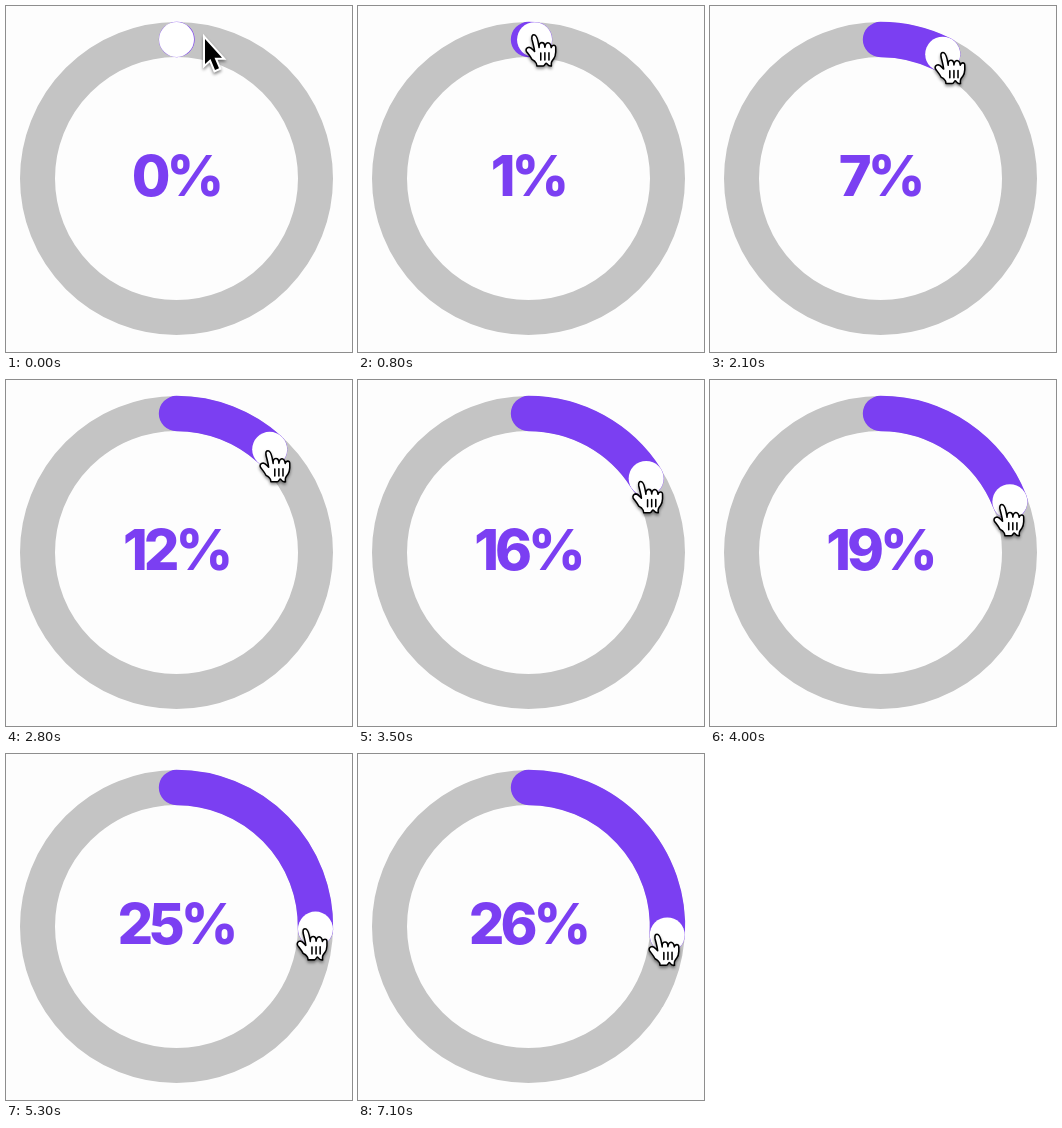
An HTML page for the animation above (7.8 s loop, 346 px wide and 346 px high).

```html
<!DOCTYPE html>
<html lang="en">
<head>
<meta charset="utf-8">
<title>Circular slider</title>
<style>
  html, body { margin: 0; width: 100%; height: 100%; overflow: hidden; background: #fdfdfd; }
  svg { display: block; width: 100%; height: 100%; }
  text { font: 800 56px Inter, "Open Sans", sans-serif; letter-spacing: -4px; fill: #7b3ff2; text-anchor: middle; }
  .cursor { filter: drop-shadow(0 2px 1.5px rgba(0, 0, 0, .45)); }
</style>
</head>
<body>
<svg viewBox="0 0 346 346">
  <circle cx="170.5" cy="172.5" r="139" fill="none" stroke="#c4c4c4" stroke-width="35"/>
  <path id="arc" fill="none" stroke="#7b3ff2" stroke-width="35.4" stroke-linecap="round"/>
  <circle id="knob" r="17.5" fill="#fff"/>
  <text id="label" x="170" y="190"></text>
  <g id="arrow" class="cursor">
    <path d="M1 2V27L6.5 22 11 33 15 31.3 10.5 20.8H18Z"
          stroke="#fff" stroke-width="4" paint-order="stroke"/>
  </g>
  <g id="hand" class="cursor">
    <g transform="scale(2.05) translate(-12.2 -8.05)" fill="#fff" stroke="#000"
       stroke-width=".75" stroke-linecap="round" stroke-linejoin="round">
      <path d="M11.3 20.4C10.5 18.8 9.4 17.6 8.6 16.5 8.1 15.4 8.9 14.4 9.9 14.4
        C11 14.5 11.8 15.8 12.6 16.5 12.4 14.4 11.7 12.4 11.3 10.5
        C11.1 9 11.5 8.4 12.3 8.4 13.5 8.4 13.9 10 14.3 11.8L14.8 14.6
        C14.7 13 15.2 12.2 16.1 12.2 17.2 12.2 17.6 13 17.6 14.5
        C17.8 12.9 18.2 12.4 19.1 12.3 20.3 12.4 20.5 13.3 20.7 14.6
        C21 13.2 22.9 13.1 22.9 14.5V16.8C22.8 18.6 22.6 19.2 22 19.9
        C20.8 21.4 20.6 21.8 20.8 23.6 19.6 23.8 19.3 23.5 18.6 22.5
        Q18.2 22 17.9 22.5C17.2 23.6 17 23.6 16.8 23.6H13.7
        C13.8 22.2 13.4 22.1 12.4 21.1Z"/>
      <path d="M15.6 17.3V20.7M17.6 17.2V20.7M19.6 17.2V20.7"/>
    </g>
  </g>
</svg>
<script>
const LOOP = 7800, STEP = 100;
const APPROACH_END = 400, DRAG_START = 800, DRAG_END = 5500;
const CX = 170.5, CY = 172.5, R = 139, KNOB_R = 17.5;
const POINTER_START = [198, 31];

const [arc, knob, label, arrow, hand] =
  ["arc", "knob", "label", "arrow", "hand"].map(id => document.getElementById(id));

const radians = degrees => degrees * Math.PI / 180;
const lerp = (a, b, p) => a + (b - a) * p;

// Cubic from a to b with the given slopes at its ends.
function hermite(a, b, slopeA, slopeB, u) {
  return lerp(a, b, u * u * (3 - 2 * u))
    + u * (1 - u) * (slopeA * (1 - u) - slopeB * u);
}

function polar(degrees, radius) {
  const a = radians(degrees);
  return [CX + radius * Math.sin(a), CY - radius * Math.cos(a)];
}

function sliderAngle(t) {
  if (t < DRAG_START) return 0;
  const u = Math.min((t - DRAG_START) / (DRAG_END - DRAG_START), 1);
  return hermite(2.5, 93.5, 69, 53, u);
}

// The pointer keeps close to the knob, drifting inwards as it goes round.
function pointerAt(t, angle) {
  const grip = polar(angle - 0.4, 136.5 + 8 * Math.cos(radians(2 * angle)));
  const p = Math.min(t / APPROACH_END, 1);
  return POINTER_START.map((start, i) => lerp(start, grip[i], p));
}

function draw(now) {
  const t = Math.floor(now % LOOP / STEP) * STEP;
  const angle = sliderAngle(t);
  const [kx, ky] = polar(angle, R);
  const [x, y] = pointerAt(t, angle);
  const hovering = Math.hypot(x - kx, y - ky) < KNOB_R;

  // The minimum length leaves a sliver of colour beside the resting knob.
  arc.setAttribute("d", `M${CX} ${CY - R}A${R} ${R} 0 0 1 ${polar(Math.max(angle, 0.2), R)}`);
  knob.setAttribute("cx", kx);
  knob.setAttribute("cy", ky);
  label.textContent = Math.round(angle / 3.6) + "%";

  for (const cursor of [arrow, hand]) {
    cursor.setAttribute("transform", `translate(${x} ${y})`);
    cursor.style.display = (cursor === hand) === hovering ? "" : "none";
  }
}

function tick() {
  draw(performance.now());
  requestAnimationFrame(tick);
}
tick();
</script>
</body>
</html>
```
